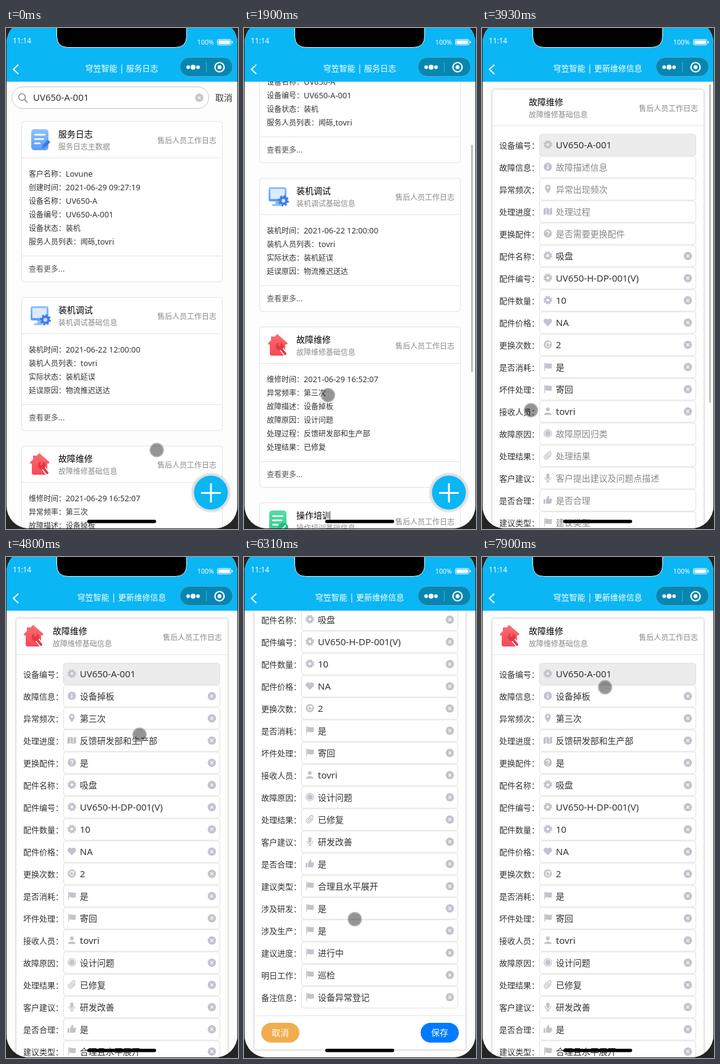
Animation, 377 px wide and 812 px high, one loop 8 s. Source, as an HTML page:

```html
<!DOCTYPE html>
<html lang="zh-CN">
<head>
<meta charset="utf-8">
<title>服务日志</title>
<style>
html, body { margin: 0; width: 100%; height: 100%; overflow: hidden; background: #222; }
svg { display: block; width: 100%; height: 100%; font-family: 'Noto Sans', 'Noto Sans CJK SC', 'Noto Sans CJK', sans-serif; }
</style>
</head>
<body>
<svg id="stage" viewBox="0 0 377 812" xmlns="http://www.w3.org/2000/svg"></svg>
<script>
const LOOP = 8000, BLUE = '#0ab6f4', GREY = '#c0c4cc';
const BRAND = '穹笠智能', CLIENT = 'Lovune', USER = 'tovri', TUTOR = '闻砾';
const stage = document.getElementById('stage');

// ---- drawing helpers ----
const text = (x, y, s, size = 12, fill = '#333', extra = '') =>
  `<text x="${x}" y="${y + size * 0.36}" font-size="${size}" fill="${fill}" ${extra}>` +
  s.replace(/[!-~]+( [!-~]+)*/g, m => `<tspan font-size="${size * 1.07}">${m}</tspan>`) + '</text>';
const rect = (x, y, w, h, rx, fill, extra = '') =>
  `<rect x="${x}" y="${y}" width="${w}" height="${h}" rx="${rx}" fill="${fill}" ${extra}/>`;
const circle = (x, y, r, fill, extra = '') => `<circle cx="${x}" cy="${y}" r="${r}" fill="${fill}" ${extra}/>`;
const path = (d, fill, extra = '') => `<path d="${d}" fill="${fill}" ${extra}/>`;
const line = (d, color, w, extra = '') => path(d, 'none', `stroke="${color}" stroke-width="${w}" ${extra}`);
const at = (x, y, body) => `<g transform="translate(${x} ${y})">${body}</g>`;
const round = 'stroke-linecap="round" stroke-linejoin="round"';
const END = 'text-anchor="end"', MID = 'text-anchor="middle"';

const clear = (x, y, fill) => at(x, y, circle(0, 0, 6.7, fill) + line('M-2.3-2.3L2.3 2.3M2.3-2.3L-2.3 2.3', '#fff', 1.2));

// ---- card icons, centred on 0,0 ----
const sheet = (id, pen) => rect(-14, -17, 28, 34, 5, `url(#${id})`) +
  line('M-8-8H8M-8-1H6M-8 6H0', '#fff', 2.4, round) + pen;
const cardIcons = {
  log: sheet('blue', path('M3 14L5 8L13 0L17 4L9 12Z', '#3a78ee')),
  setup: rect(-15, -15, 29, 23, 3, 'url(#blue)') + rect(-12, -12, 23, 16, 1, '#dcebff') +
    line('M-8 14H4', '#8bbcfb', 3, round) + path('M-4 8H2V14H-4Z', '#8bbcfb') +
    circle(9, 7, 7, '#3f7df0') + circle(9, 7, 7.4, 'none', 'stroke="#3f7df0" stroke-width="3" stroke-dasharray="3.3 2.5"') +
    circle(9, 7, 3, '#cfe2ff'),
  repair: path('M-1-18L15-4Q17-1 13-1H12V14Q12 17 9 17H-10Q-13 17-13 14V-1H-14Q-18-1-15-4L-11-8V-14H-6V-13Z', 'url(#red)') +
    line('M5 5L12 14', '#fff', 7, round) + circle(3, 2, 6.4, '#e23a47') +
    line('M4 4L12 14', '#e23a47', 4, round) + path('M1-6H6L4 1H1Z', '#fb5b66'),
  train: sheet('green', circle(9, 11, 8, '#1fbf7f') + line('M6 14L12 8', '#fff', 2.2, round)),
};

// ---- field icons, centred on 0,0 ----
const disc = circle(0, 0, 6.7, GREY);
const fieldIcons = {
  cog: circle(0, 0, 4, 'none', `stroke="${GREY}" stroke-width="3.4"`) +
    circle(0, 0, 5.9, 'none', `stroke="${GREY}" stroke-width="2.4" stroke-dasharray="2.7 1.93"`),
  info: disc + line('M0-4V-2.2M0-1V4', '#fff', 1.8),
  pin: path('M0 7C-3 3-4.8 0-4.8-2.2A4.8 4.8 0 0 1 4.8-2.2C4.8 0 3 3 0 7ZM0-4A1.8 1.8 0 1 0 0-.4A1.8 1.8 0 0 0 0-4Z', GREY),
  map: path('M-7-4L-2.8-6V4.5L-7 6.5ZM-2-6L2 -4V6.5L-2 4.5ZM2.8-4L7-6V4.5L2.8 6.5Z', GREY),
  help: disc + line('M-2-1.6A2 2 0 1 1 0.6 0.2Q0 .6 0 1.6M0 2.9V4.3', '#fff', 1.4),
  heart: path('M0 6.5L-6 .5C-8-2-6-6-3-6C-1.4-6-.5-5 0-4C.5-5 1.4-6 3-6C6-6 8-2 6 .5Z', GREY),
  redo: disc + line('M2.6-2A3.3 3.3 0 1 0 3.2 1M3.4-4V-1H.6', '#fff', 1.3),
  flag: path('M-6-6.5H-4.8V6.5H-6ZM-4.4-5.5C-2-6.5 0-4 6.5-5.5V2.5C1 4-2 1.5-4.4 3Z', GREY),
  user: circle(0, -3, 3.1, GREY) + path('M-6.2 6.2C-6.2 1 6.2 1 6.2 6.2Z', GREY),
  radio: circle(0, 0, 6.2, 'none', `stroke="${GREY}" stroke-width="1.3"`) + circle(0, 0, 4.5, GREY),
  clip: line('M5.5-.5L0 5C-3.5 8-8 3-4.8 0L1-5.5C3.5-7.5 6.5-4.5 4.4-2.2L-1 3C-2.4 4-3.8 2.4-2.7 1.3L2-3.2', GREY, 1.4),
  mic: rect(-2.6, -7, 5.2, 9, 2.6, GREY) + line('M-4.8-1C-4.8 5.5 4.8 5.5 4.8-1M0 4V6.5M-3 6.6H3', GREY, 1.3),
  like: path('M-7-1H-4V6H-7ZM-3-1L.5-6.8C3-6.8 2.6-3.5 2-2H6.6C7.4 0 6 5 4.8 6H-3Z', GREY),
};

// ---- first page ----
const cards = [
  ['log', '服务日志', '服务日志主数据', [`客户名称：${CLIENT}`, '创建时间：2021-06-29 09:27:19', '设备名称：UV650-A',
    '设备编号：UV650-A-001', '设备状态：装机', `服务人员列表：${TUTOR},${USER}`]],
  ['setup', '装机调试', '装机调试基础信息', ['装机时间：2021-06-22 12:00:00', `装机人员列表：${USER}`, '实际状态：装机延误', '延误原因：物流推迟送达']],
  ['repair', '故障维修', '故障维修基础信息', ['维修时间：2021-06-29 16:52:07', '异常频率：第三次', '故障描述：设备掉板',
    '故障原因：设计问题', '处理过程：反馈研发部和生产部', '处理结果：已修复']],
  ['train', '操作培训', '操作培训基础信息', ['培训开始时间：2021-06-30 13:05:09', '培训结束时间：2021-06-30 19:00:00',
    `培训导师：${TUTOR}`, '被培训部门：生产部,设备部']],
];
const header = (x, right, y, title, sub) => text(x, y + 21, title, 14, '#000') + text(x, y + 42, sub, 12, '#8a8a8a') +
  text(right, y + 32, '售后人员工作日志', 12, '#8a8a8a', END);

function logPage() {
  let top = 151, out = rect(9.5, 95.5, 320, 35, 17.5, '#fff', 'stroke="#c4c4c4"') +
    circle(26, 112, 5.4, 'none', 'stroke="#888" stroke-width="1.5"') + line('M30 116L34.5 120.5', '#888', 1.7, round) +
    text(44, 113, 'UV650-A-001', 14) + clear(314, 113, '#c6c6c6') + text(340, 113, '取消', 14);
  for (const [icon, title, sub, rows] of cards) {
    const foot = top + 86 + rows.length * 22, h = foot + 42 - top;
    out += rect(25.5, top + .5, 326, h, 4, '#fff', 'stroke="#e2e2e2"') +
      line(`M26 ${top + 59.5}H351M26 ${foot + .5}H351`, '#e4e4e4', 1) +
      at(55, top + 30, cardIcons[icon]) + header(85, 342, top, title, sub) +
      rows.map((r, i) => text(37, top + 86 + i * 22, r)).join('') + text(37, foot + 22, '查看更多...', 12, '#555');
    top += h + 25;
  }
  return out;
}

// ---- second page: label, icon, value, placeholder ----
const fields = [
  ['设备编号', 'cog', 'UV650-A-001'], ['故障信息', 'info', '设备掉板', '故障描述信息'],
  ['异常频次', 'pin', '第三次', '异常出现频次'], ['处理进度', 'map', '反馈研发部和生产部', '处理过程'],
  ['更换配件', 'help', '是', '是否需要更换配件'], ['配件名称', 'cog', '吸盘'],
  ['配件编号', 'cog', 'UV650-H-DP-001(V)'], ['配件数量', 'cog', '10'], ['配件价格', 'heart', 'NA'],
  ['更换次数', 'redo', '2'], ['是否消耗', 'flag', '是'], ['坏件处理', 'flag', '寄回'], ['接收人员', 'user', USER],
  ['故障原因', 'radio', '设计问题', '故障原因归类'], ['处理结果', 'clip', '已修复', '处理结果'],
  ['客户建议', 'mic', '研发改善', '客户提出建议及问题点描述'], ['是否合理', 'like', '是', '是否合理'],
  ['建议类型', 'flag', '合理且水平展开', '建议类型'], ['涉及研发', 'flag', '是'], ['涉及生产', 'flag', '是'],
  ['建议进度', 'flag', '进行中'], ['明日工作', 'flag', '巡检'], ['备注信息', 'flag', '设备异常登记'],
];
const button = (x, label, fill) => rect(x, 1023, 62, 32, 16, fill) + text(x + 31, 1039, label, 14, '#fff', MID);

function formPage() {
  let base = rect(16.5, 99.5, 344, 967, 4, '#fff', 'stroke="#e0e0e0" filter="url(#soft)"') +
    line('M17 158.5H360M17 1011.5H360', '#e6e6e6', 1) + header(76, 351, 99, '故障维修', '故障维修基础信息') +
    button(28, '取消', '#f0ad4e') + button(287, '保存', '#007bff');
  let empty = '', full = at(45, 128, cardIcons.repair);
  fields.forEach(([label, icon, value, hint], i) => {
    const y = 189.5 + i * 36;
    base += text(28, y + .5, label + '：', 13) +
      rect(93.5, y - 17.5, 254, 35, 4, i ? '#fff' : '#ececec', 'stroke="#e0e0e0"') + at(107, y - .5, fieldIcons[icon]);
    const filled = text(120, y + .5, value, 14) + (i ? clear(334.5, y, GREY) : '');
    if (hint) {
      empty += text(120, y, hint, 14, '#888');
      full += filled;
    } else base += filled;
  });
  return `${base}<g id="empty">${empty}</g><g id="full">${full}</g>`;
}

const navTitle = s => text(188, 65.5, `${BRAND} | ${s}`, 13, '#fff', MID + ' font-weight="500"');
const gradient = (id, a, b) => `<linearGradient id="${id}" x2="0" y2="1"><stop stop-color="${a}"/><stop offset="1" stop-color="${b}"/></linearGradient>`;

stage.innerHTML = `<defs>
  ${gradient('blue', '#8fc2fd', '#5c9cf8')}${gradient('red', '#ff6b72', '#f74a58')}${gradient('green', '#57dca4', '#35cc8f')}
  <filter id="soft" x="-5%" y="-5%" width="110%" height="110%"><feDropShadow dx="0" dy="0" stdDeviation="1.5" flood-opacity=".22"/></filter>
  <filter id="lift" x="-20%" y="-20%" width="140%" height="140%"><feDropShadow dx="0" dy="0" stdDeviation="1.5" flood-opacity=".35"/></filter>
  <clipPath id="phone"><rect x="1" y="-12" width="375" height="823" rx="36"/></clipPath>
  <clipPath id="body"><rect y="87" width="377" height="725"/></clipPath></defs>
  ${rect(0, 0, 377, 812, 0, '#252525')}
  <g clip-path="url(#phone)">
    ${rect(0, 0, 377, 812, 0, '#fdfdfd')}${rect(0, 0, 377, 87, 0, BLUE)}
    <g id="first">${navTitle('服务日志')}
      <g clip-path="url(#body)"><g id="log">${logPage()}</g></g>
      ${circle(333, 753, 30.5, '#dedede', 'filter="url(#lift)"')}${circle(333, 753, 27.5, BLUE)}${line('M317 753.5H349M333 738V769', '#fff', 3)}
    </g>
    <g id="second">${rect(0, 47, 377, 765, 0, '#fdfdfd')}${rect(0, 47, 377, 40, 0, BLUE)}${navTitle('更新维修信息')}
      <g clip-path="url(#body)"><g id="form">${formPage()}</g></g>
    </g>
    <rect id="thumb" x="369" width="3" rx="1.5" fill="#bdbdbd"/>
    ${line('M20 59.5L12 67L20 74.5', '#fff', 2)}
    ${rect(282.5, 47.5, 86, 31, 15.5, '#0886b2', 'stroke="#4db0d2"')}${line('M325.5 55V72', '#4db0d2', 1)}
    ${circle(296, 63.5, 2.9, '#fff')}${circle(304, 63.5, 4, '#fff')}${circle(312, 63.5, 2.9, '#fff')}
    ${circle(347, 63.5, 7.5, 'none', 'stroke="#fff" stroke-width="2.2"')}${circle(347, 63.5, 3.2, '#fff')}
    ${text(11, 21.5, '11:14', 11, '#fff')}${text(338, 23, '100%', 10, '#fff', END)}
    ${rect(343.5, 18.5, 22, 9, 2, 'none', 'stroke="#fff"')}${rect(345, 20, 19, 6, 1, '#fff')}${rect(367, 21, 1.5, 4, .7, '#fff')}
    ${path('M82.5-2V13Q82.5 31.5 101 31.5H275Q293.5 31.5 293.5 13V-2Z', '#000', 'stroke="#eaf8ff"')}
    ${rect(132, 797, 112, 5.5, 2.7, '#000')}
    <g id="pointer">${circle(0, 0, 10.5, '#000', 'fill-opacity=".42" stroke="#a0a0a0" stroke-opacity=".75" stroke-width="2.4"')}</g>
  </g>`;

// ---- motion ----
// Moments the screen refreshes: [first, last, steps]
const bursts = [[0, 0, 1], [120, 480, 4], [630, 750, 2], [900, 900, 1], [1900, 2260, 4], [2410, 2530, 2], [2680, 3130, 4],
  [3660, 3780, 2], [3930, 4060, 2], [4200, 4800, 6], [4950, 5200, 3], [5350, 5500, 2], [5650, 6010, 4],
  [6160, 6310, 2], [6710, 6950, 3], [7100, 7100, 1], [7270, 7510, 3], [7660, 7900, 3]];
const ticks = bursts.flatMap(([a, b, n]) => Array.from({ length: n }, (_, i) => a + (n > 1 ? (b - a) * i / (n - 1) : 0)));

const logScroll = [[0, 0], [120, 22], [240, 70], [360, 96], [480, 100], [1780, 100], [1900, 193], [2020, 250], [2260, 300]];
const formScroll = [[5350, 0], [5500, 6], [5650, 100], [5890, 250], [6010, 268], [6600, 268], [6710, 200], [6830, 60], [6950, 0]];
const slide = [[3500, 377], [3660, 220], [3780, 45], [3930, 0]];
const route = [[0, 245, 684], [120, 245, 684], [480, 175, 696], [630, 150, 640], [750, 142, 601], [900, 136.5, 595],
  [1900, 136.5, 595], [2260, 128, 610], [2410, 112, 637], [2530, 95, 617], [2680, 91, 617], [2830, 82, 619],
  [3130, 79.5, 619.5], [4060, 79.5, 619.5], [4200, 89, 626], [4800, 217, 288], [5075, 213, 208], [5200, 213, 228],
  [5350, 211, 284], [5650, 190, 480], [6010, 169.5, 580], [6160, 175.5, 586], [6310, 180, 587], [6950, 180, 587],
  [7100, 180.5, 583], [7270, 184, 555], [7510, 205, 272], [7660, 205, 250], [7900, 200, 211]];
const thumbShown = [[120, 900], [1900, 2530], [3930, 4500], [5500, 6310], [6710, 7510]];

function follow(keys, t, k = 1) {
  const i = keys.findIndex(p => p[0] > t);
  if (i === 0) return keys[0][k];
  if (i < 0) return keys[keys.length - 1][k];
  const a = keys[i - 1], b = keys[i];
  return a[k] + (b[k] - a[k]) * (t - a[0]) / (b[0] - a[0]);
}

const parts = {};
for (const id of ['log', 'form', 'first', 'second', 'thumb', 'pointer', 'empty', 'full']) parts[id] = document.getElementById(id);
const move = (id, x, y) => parts[id].setAttribute('transform', `translate(${x} ${y})`);
const show = (id, on) => parts[id].setAttribute('visibility', on ? 'visible' : 'hidden');
const display = (id, on) => parts[id].setAttribute('display', on ? 'inline' : 'none');

function render(time) {
  const t = ticks.filter(v => v <= time).pop();
  const onForm = t >= 3660;
  const scroll = follow(onForm ? formScroll : logScroll, t);
  if (onForm) move('form', 0, -scroll); else move('log', 0, -scroll);
  display('first', t < 3930);
  display('second', onForm);
  move('second', follow(slide, t), 0);
  display('empty', t < 4060);
  display('full', t >= 4060);
  parts.thumb.setAttribute('y', 91 + scroll * (onForm ? 0.716 : 0.508));
  parts.thumb.setAttribute('height', onForm ? 516.5 : 369);
  show('thumb', thumbShown.some(([a, b]) => t >= a && t < b));
  move('pointer', follow(route, t), follow(route, t, 2));
  show('pointer', t !== 5500);
}

const start = performance.now();
function loop() {
  render((performance.now() - start) % LOOP);
  requestAnimationFrame(loop);
}
loop();
</script>
</body>
</html>
```
